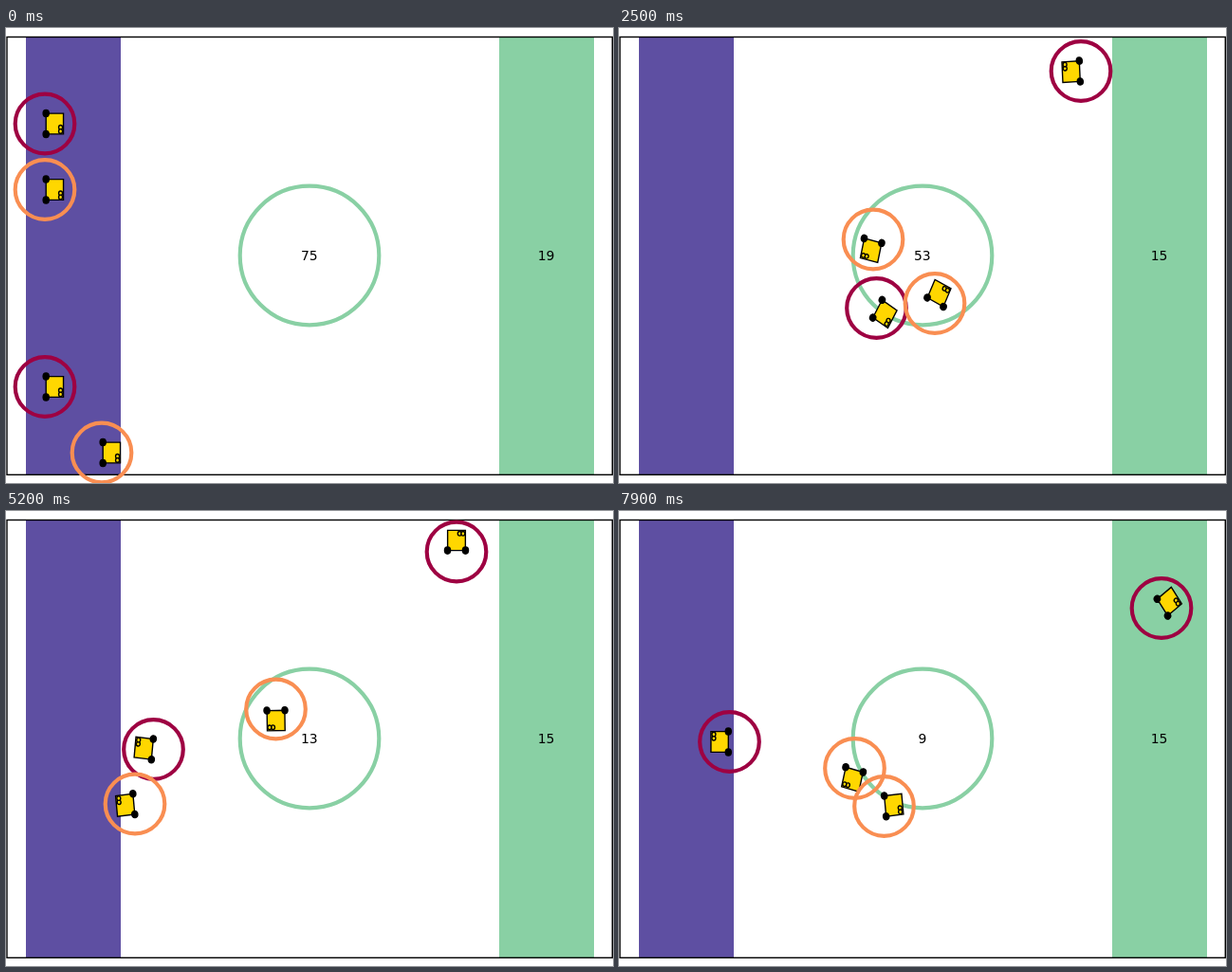
An HTML page with a canvas that plays this animation: 640x480 px, repeating every 8000 ms.

```html
<!DOCTYPE html>
<html lang="en">
<head>
<meta charset="utf-8">
<title>Robot arena</title>
<style>
  html, body { margin: 0; width: 100%; height: 100%; overflow: hidden; background: #fff; }
  canvas { display: block; }
</style>
</head>
<body>
<canvas id="stage" width="640" height="480"></canvas>
<script>
const ctx = document.getElementById('stage').getContext('2d');
const STEP = 100, STEPS = 80;
const UNIT_X = 19.94, UNIT_Y = 23.1; // pixels per arena unit
const THIN = 1.39, THICK = 4.17;
const RED = '#9e0142', ORANGE = '#f98e52', PURPLE = '#5e4fa2', GREEN = '#89d0a4';

// Waypoints: step, x, y, heading in degrees
const robots = [
  { color: RED, path: [
    [0, 41, 101, 0], [9, 297, 101, 0], [11, 328, 51, -60], [16, 408, 50.5, 0],
    [18, 462, 50, 0], [21, 543, 49, 0], [25, 487, 45.5, 177], [27, 460, 45, 177],
    [31, 536, 43.5, 360], [35, 478, 43, 185], [37, 475, 43, 270], [53, 475, 43, 270],
    [54, 474, 44, 270], [62, 530, 155.5, 450], [67, 548, 43.5, 278], [72, 588, 104, 420],
    [76, 560, 112, 500], [79, 572, 102.5, 324]] },
  { color: ORANGE, path: [
    [0, 41, 170.5, 0], [9, 184, 170.5, 0], [16, 281.5, 171, 0], [18, 300, 172, 0],
    [25, 268, 223, 103], [33, 235, 230, 170], [42, 178.5, 216, 169], [45, 150, 212, 169],
    [50, 272, 190, -8], [52, 284.5, 209, 89], [56, 284, 262, 95], [62, 249.5, 258, 75],
    [72, 256, 246, -60], [79, 248.5, 271.5, 104]] },
  { color: RED, path: [
    [0, 41, 378.5, 0], [9, 210, 378, 0], [13, 303, 330, -35], [16, 276, 313.5, -171],
    [18, 245, 308, -171], [25, 271.5, 295.5, 31], [27, 272, 291, 31], [36, 106, 262, 188],
    [42, 203.5, 272, 327], [44, 215, 262, 327], [52, 155.5, 251.5, 186], [54, 130, 250, 186],
    [62, 184, 256, 3], [64, 222, 257, 3], [71, 215, 243, 180], [79, 116.5, 243.5, 180]] },
  { color: ORANGE, path: [
    [0, 101, 448, 0], [15, 318, 448, 0], [16, 321, 444.5, -86], [18, 324, 406, -86],
    [25, 333, 290.5, -64], [27, 342, 270, -64], [36, 258, 265, 180], [42, 252.5, 291.5, 85],
    [44, 252, 310, 85], [52, 136, 309, 174], [54, 113, 310, 174], [57, 70, 311, 174],
    [62, 186, 309, 12], [64, 225, 320, 12], [70, 250, 322, 5], [79, 279.5, 311.5, -6]] }
];

const sourceCount = [[0, 75], [14, 75], [16, 71], [25, 53], [42, 35], [52, 13], [77, 13], [79, 9]];
const goalCount = [[0, 19], [20, 19], [22, 15], [79, 15]];

const mix = (a, b, k) => a + (b - a) * k;

function segment(keys, step) {
  let i = 1;
  while (i < keys.length - 1 && keys[i][0] < step) i++;
  const from = keys[i - 1], to = keys[i];
  return { from, to, k: (step - from[0]) / (to[0] - from[0]) };
}

function poseAt(path, step) {
  const { from, to, k } = segment(path, step);
  const turn = Math.min(1, (step - from[0]) / Math.min(2, to[0] - from[0]));
  return { x: mix(from[1], to[1], k), y: mix(from[2], to[2], k), angle: mix(from[3], to[3], turn) };
}

// Counters fall in twos, so they stay odd
function countAt(keys, step) {
  const { from, to, k } = segment(keys, step);
  return 2 * Math.round((mix(from[1], to[1], k) - 1) / 2) + 1;
}

function ring(x, y, r, color) {
  ctx.beginPath();
  ctx.arc(x, y, r, 0, 2 * Math.PI);
  ctx.strokeStyle = color;
  ctx.lineWidth = THICK;
  ctx.stroke();
}

// Builds a path in arena units, paints it with an even outline
function shape(pose, build, fill) {
  ctx.save();
  ctx.translate(pose.x, pose.y);
  ctx.scale(UNIT_X, UNIT_Y);
  ctx.rotate(pose.angle * Math.PI / 180);
  ctx.beginPath();
  build();
  ctx.restore();
  ctx.fillStyle = fill;
  ctx.fill();
  ctx.strokeStyle = '#000';
  ctx.lineWidth = THIN;
  ctx.stroke();
}

function disc(pose, x, y, r, fill) {
  shape(pose, () => ctx.arc(x, y, r, 0, 2 * Math.PI), fill);
}

function drawRobot({ color, path }, step) {
  const pose = poseAt(path, step);
  shape(pose, () => ctx.rect(0.06, -0.47, 0.92, 0.94), '#ffd700');
  for (const side of [-0.475, 0.475]) disc(pose, 0.06, side, 0.155, '#000');
  for (const side of [0.165, 0.345]) disc(pose, 0.83, side, 0.1, '#ffd700');
  ring(pose.x, pose.y, 31.3, color);
}

function drawArena(step) {
  ctx.fillStyle = '#fff';
  ctx.fillRect(0, 0, 640, 480);
  ctx.fillStyle = PURPLE;
  ctx.fillRect(21, 9.5, 100, 462);
  ctx.fillStyle = GREEN;
  ctx.fillRect(520, 9.5, 100, 462);
  ctx.strokeStyle = '#000';
  ctx.lineWidth = THIN;
  ctx.strokeRect(1, 9.5, 638.3, 461.8);
  ring(320, 240, 73.3, GREEN);
  ctx.fillStyle = '#000';
  ctx.font = '13.89px "DejaVu Sans", sans-serif';
  ctx.textAlign = 'center';
  ctx.fillText(countAt(sourceCount, step), 319.8, 244.5);
  ctx.fillText(countAt(goalCount, step), 569.5, 244.5);
}

function frame(now) {
  const step = Math.floor(now / STEP) % STEPS;
  drawArena(step);
  for (const robot of robots) drawRobot(robot, step);
}

let start;
function loop(now) {
  start ??= now;
  frame(Math.max(0, now - start));
  requestAnimationFrame(loop);
}
frame(0);
requestAnimationFrame(loop);
</script>
</body>
</html>
```
